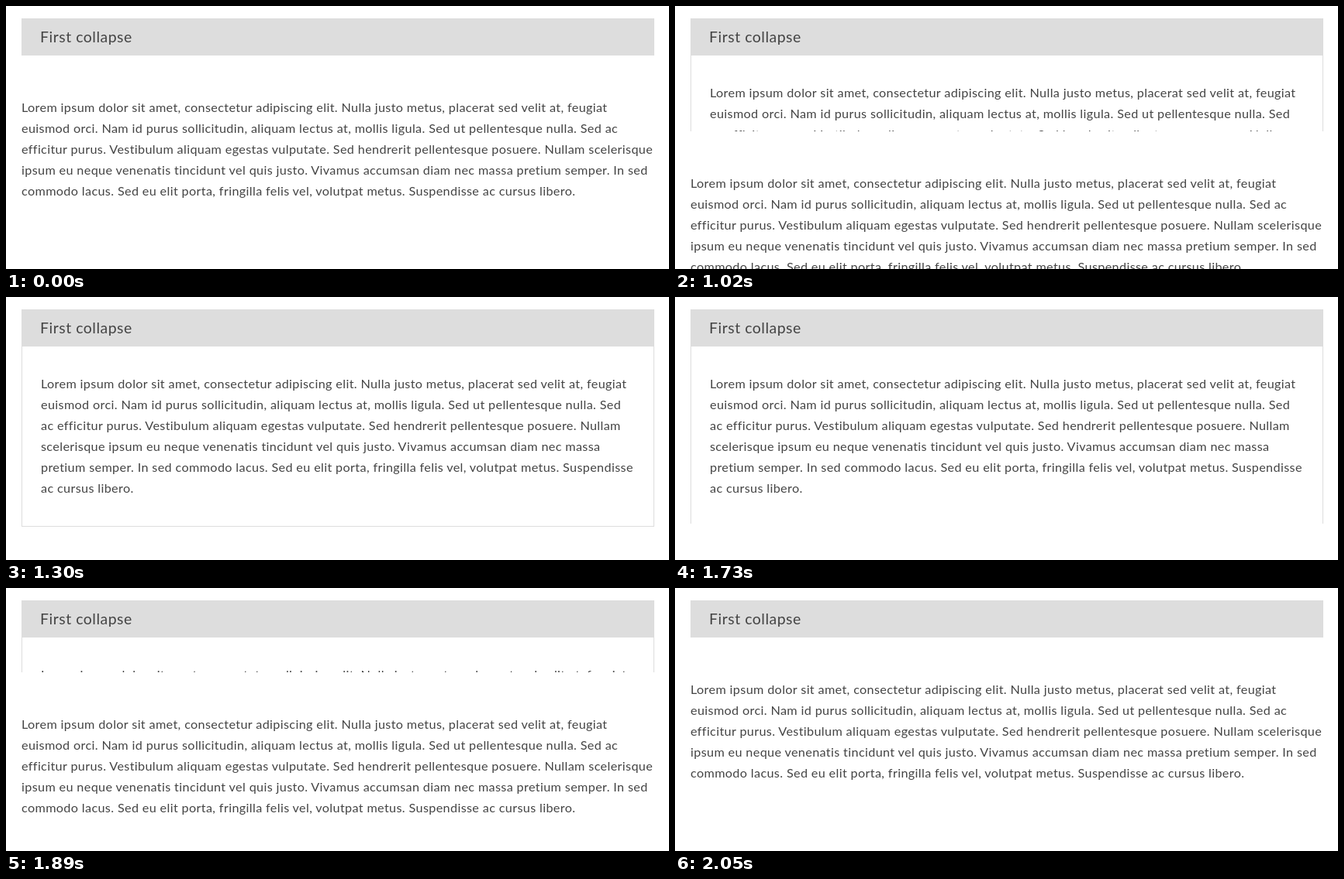
These frames come from a looping animation (855 px wide and 340 px high, 2.91 s). An HTML page:

```html
<!DOCTYPE html>
<html lang="en">
<head>
<meta charset="utf-8">
<title>First collapse</title>
<style>
  html, body { margin: 0; width: 100%; height: 100%; overflow: hidden; background: #fff; }
  body { font: 16.2px/27px Lato, sans-serif; letter-spacing: .356px; color: #444; }
  main { box-sizing: border-box; height: 100%; padding: 16px 19px 0 20px; overflow: hidden; }
  header { height: 48px; padding-left: 24px; background: #ddd; font-size: 19.4px; line-height: 48px; letter-spacing: .54px; }
  p { margin: 0; white-space: pre; }
  #clip { height: 0; overflow: hidden; }
  #panel { box-sizing: border-box; height: 233px; padding: 34px 0 0 24px; border: 1px solid #ddd; border-top: 0; }
  #intro { margin-top: 53px; }
</style>
</head>
<body>
<main>
  <header>First collapse</header>
  <div id="clip"><p id="panel">Lorem ipsum dolor sit amet, consectetur adipiscing elit. Nulla justo metus, placerat sed velit at, feugiat
euismod orci. Nam id purus sollicitudin, aliquam lectus at, mollis ligula. Sed ut pellentesque nulla. Sed
ac efficitur purus. Vestibulum aliquam egestas vulputate. Sed hendrerit pellentesque posuere. Nullam
scelerisque ipsum eu neque venenatis tincidunt vel quis justo. Vivamus accumsan diam nec massa
pretium semper. In sed commodo lacus. Sed eu elit porta, fringilla felis vel, volutpat metus. Suspendisse
ac cursus libero.</p></div>
  <p id="intro">Lorem ipsum dolor sit amet, consectetur adipiscing elit. Nulla justo metus, placerat sed velit at, feugiat
euismod orci. Nam id purus sollicitudin, aliquam lectus at, mollis ligula. Sed ut pellentesque nulla. Sed ac
efficitur purus. Vestibulum aliquam egestas vulputate. Sed hendrerit pellentesque posuere. Nullam scelerisque
ipsum eu neque venenatis tincidunt vel quis justo. Vivamus accumsan diam nec massa pretium semper. In sed
commodo lacus. Sed eu elit porta, fringilla felis vel, volutpat metus. Suspendisse ac cursus libero.</p>
</main>
<script>
const LOOP = 2910, STEP = 40, LEAD = 11, FULL = 233;
const clip = document.getElementById('clip');

const bezier = (s, a, b) => 3 * s * (1 - s) ** 2 * a + 3 * s * s * (1 - s) * b + s ** 3;

// CSS "ease": cubic-bezier(.25, .1, .25, 1)
function ease(x) {
  if (x >= 1) return 1;
  let lo = 0, hi = 1;
  for (let i = 0; i < 24; i++) {
    const mid = (lo + hi) / 2;
    if (bezier(mid, .25, .25) < x) lo = mid; else hi = mid;
  }
  return bezier(lo, .1, 1);
}

// Eased progress, held for STEP ms at a time
function progress(t, start, duration) {
  if (t < start) return 0;
  return ease((Math.floor((t - start) / STEP) * STEP + LEAD) / duration);
}

function draw() {
  const t = performance.now() % LOOP;
  const open = progress(t, 940, 357) - progress(t, 1730, 338);
  clip.style.height = Math.round(FULL * open) + 'px';
  requestAnimationFrame(draw);
}
draw();
</script>
</body>
</html>
```
